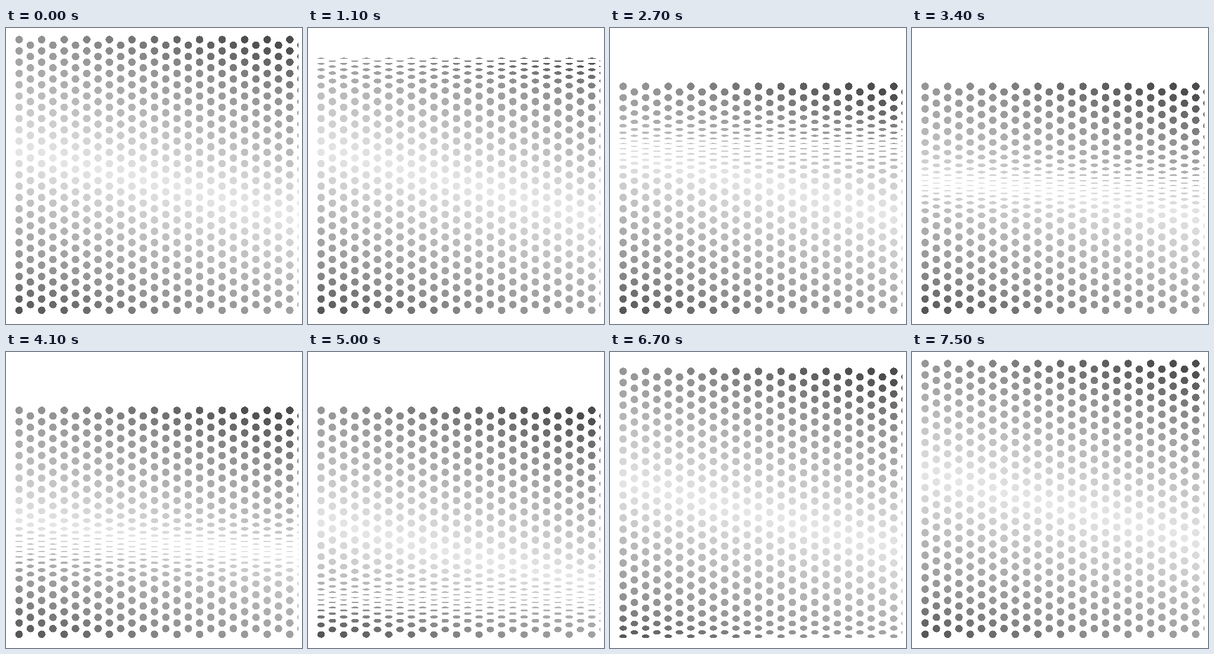
Write an HTML page without scripts that moves like this. It is 500 px wide and 500 px high and loops after 7600 ms.

```html
<!DOCTYPE html>
<html lang="en">
<head>
<meta charset="utf-8">
<title>Dot wave</title>
<style>
  @property --t { syntax: "<number>"; inherits: true; initial-value: 0; }
  @property --u { syntax: "<number>"; inherits: true; initial-value: 0; }

  html, body { margin: 0; width: 100%; height: 100%; overflow: hidden; background: #fff; }
  svg { display: block; overflow: hidden; animation: clock 7.6s steps(76) infinite; }
  @keyframes clock { from { --t: 0; } to { --t: 76; } }

  /* --u: progress of the squeeze at row --k; --drop: total squeeze that has passed it */
  .sheet, .sheet use {
    --u: clamp(0, (var(--t) - 1 - var(--k)) / 26, 1);
    --drop: var(--u) * var(--u) * (243.5 + var(--u) * (79.8 + var(--u) * (249.8 * var(--u) - 494.1)));
  }
  /* keeps the bottom edge in place */
  .sheet { --k: 49; transform: translateY(calc(-1px * (var(--drop)))); }
  .sheet use {
    --odd: 0;
    --y: (19.6 + 9.525 * var(--k));
    --thin: var(--u) * (1 - var(--u)) * (2.95 + var(--u) * (4.4 - 7.57 * var(--u)));
    transform: translateY(calc(1px * (var(--y) + var(--drop)))) scaleY(calc(1 - var(--thin)));
  }
  .sheet use:nth-child(even) { --odd: 1; }

  /* grey falls off with distance from a slanted light line */
  circle {
    --x: (22.2 + 19.05 * (2 * var(--i) + var(--odd)));
    --v: (var(--y) - 0.24 * var(--x) - 201);
    --d: max(var(--v), -1 * var(--v));
    --grey: max(76, min(230 - 0.43 * var(--d), 310 - 0.83 * var(--d)));
    cx: calc(1px * var(--x));
    r: 6.35px;
    fill: rgb(var(--grey) var(--grey) var(--grey));
    shape-rendering: crispEdges;
  }
</style>
</head>
<body>
<svg width="494" height="500">
  <defs>
    <g id="row">
      <circle style="--i:0"/><circle style="--i:1"/><circle style="--i:2"/><circle style="--i:3"/>
      <circle style="--i:4"/><circle style="--i:5"/><circle style="--i:6"/><circle style="--i:7"/>
      <circle style="--i:8"/><circle style="--i:9"/><circle style="--i:10"/><circle style="--i:11"/>
      <circle style="--i:12"/>
    </g>
  </defs>
  <g class="sheet">
    <use href="#row" style="--k:0"/><use href="#row" style="--k:1"/>
    <use href="#row" style="--k:2"/><use href="#row" style="--k:3"/>
    <use href="#row" style="--k:4"/><use href="#row" style="--k:5"/>
    <use href="#row" style="--k:6"/><use href="#row" style="--k:7"/>
    <use href="#row" style="--k:8"/><use href="#row" style="--k:9"/>
    <use href="#row" style="--k:10"/><use href="#row" style="--k:11"/>
    <use href="#row" style="--k:12"/><use href="#row" style="--k:13"/>
    <use href="#row" style="--k:14"/><use href="#row" style="--k:15"/>
    <use href="#row" style="--k:16"/><use href="#row" style="--k:17"/>
    <use href="#row" style="--k:18"/><use href="#row" style="--k:19"/>
    <use href="#row" style="--k:20"/><use href="#row" style="--k:21"/>
    <use href="#row" style="--k:22"/><use href="#row" style="--k:23"/>
    <use href="#row" style="--k:24"/><use href="#row" style="--k:25"/>
    <use href="#row" style="--k:26"/><use href="#row" style="--k:27"/>
    <use href="#row" style="--k:28"/><use href="#row" style="--k:29"/>
    <use href="#row" style="--k:30"/><use href="#row" style="--k:31"/>
    <use href="#row" style="--k:32"/><use href="#row" style="--k:33"/>
    <use href="#row" style="--k:34"/><use href="#row" style="--k:35"/>
    <use href="#row" style="--k:36"/><use href="#row" style="--k:37"/>
    <use href="#row" style="--k:38"/><use href="#row" style="--k:39"/>
    <use href="#row" style="--k:40"/><use href="#row" style="--k:41"/>
    <use href="#row" style="--k:42"/><use href="#row" style="--k:43"/>
    <use href="#row" style="--k:44"/><use href="#row" style="--k:45"/>
    <use href="#row" style="--k:46"/><use href="#row" style="--k:47"/>
    <use href="#row" style="--k:48"/>
  </g>
</svg>
</body>
</html>
```
